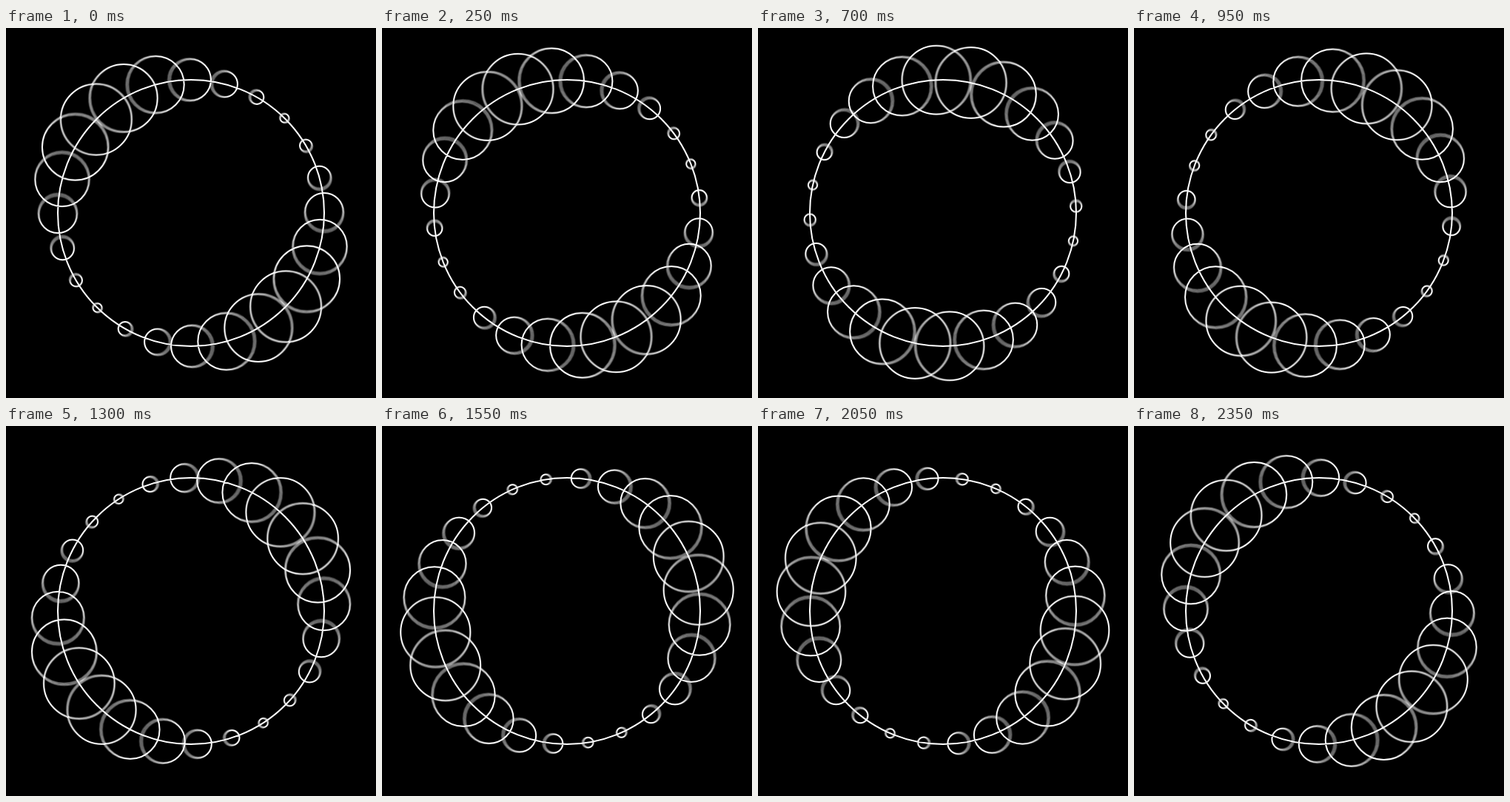
Recreate the animation shown at these times as an HTML page with a canvas. Size 500x500 px, loop 2.4 s.

```html
<!DOCTYPE html>
<html lang="en">
<head>
<meta charset="utf-8">
<title>Ring of breathing circles</title>
<style>
  html, body { margin: 0; width: 100%; height: 100%; overflow: hidden; background: #000; }
  canvas { display: block; }
</style>
</head>
<body>
<canvas id="stage" width="500" height="500"></canvas>
<script>
const ctx = document.getElementById('stage').getContext('2d');
const TAU = 2 * Math.PI;
const LOOP = 2400, STEP = 50;
const CENTER = 250, RING = 180, COUNT = 24;
const MEAN = 27, SWING = 21;
const SAMPLES = 8, SHUTTER = 0.7;

function addCircle(x, y, r) {
  ctx.moveTo(x + r, y);
  ctx.arc(x, y, r, 0, TAU);
}

// Angles run clockwise from the top; p is the loop progress, 0 to 1.
function strokeScene(p) {
  const peak = -TAU / 8 + p * TAU / 2;
  ctx.beginPath();
  addCircle(CENTER, CENTER, RING);
  for (let i = 0; i < COUNT; i++) {
    const a = i * TAU / COUNT - p * TAU / 6;
    const r = MEAN + SWING * Math.cos(2 * (a - peak));
    addCircle(CENTER + RING * Math.sin(a), CENTER - RING * Math.cos(a), r);
  }
  ctx.stroke();
}

// Motion blur: average several moments while the shutter is open.
function draw(ms) {
  const start = Math.floor((ms % LOOP) / STEP) * STEP;
  ctx.globalCompositeOperation = 'source-over';
  ctx.fillStyle = '#000';
  ctx.fillRect(0, 0, 500, 500);
  ctx.globalCompositeOperation = 'lighter';
  ctx.strokeStyle = `rgba(255, 255, 255, ${1 / SAMPLES})`;
  ctx.lineWidth = 2;
  for (let s = 0; s < SAMPLES; s++) {
    strokeScene((start + STEP * SHUTTER * s / SAMPLES) / LOOP);
  }
}

function tick() {
  draw(performance.now());
  requestAnimationFrame(tick);
}
tick();
</script>
</body>
</html>
```
